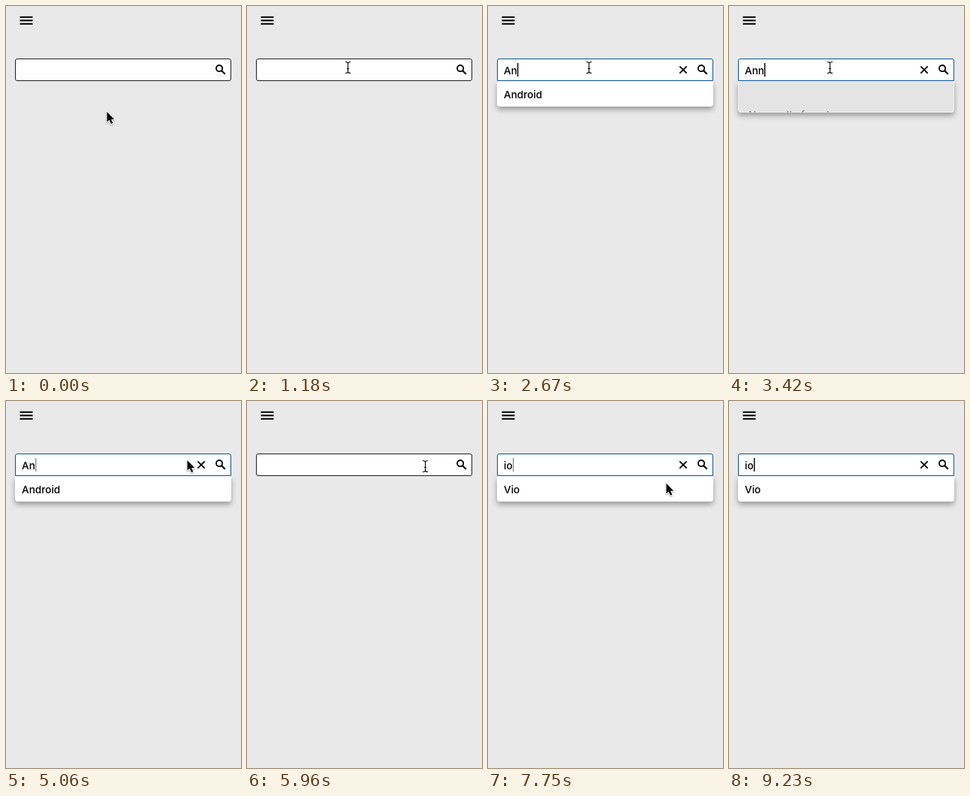
Recreate the animation shown at these times as an HTML page with a canvas. Size 313 px wide and 489 px high, loop 9.33 s.

```html
<!DOCTYPE html>
<html lang="en">
<head>
<meta charset="utf-8">
<title>Search field</title>
<style>
html, body { margin: 0; width: 100%; height: 100%; overflow: hidden; background: #e9e9e9; }
canvas { display: block; width: 313px; height: 489px; }
</style>
</head>
<body>
<canvas id="stage"></canvas>
<script>
const W = 313, H = 489, LOOP = 9330, STEP = 148.95;
const FONT = '500 13.6px Inter, "Open Sans", sans-serif';
const ITEMS = ['Android', 'Vio', 'Grombix', 'Linux', 'RavOS', 'Web'];
const canvas = document.getElementById('stage');
const ctx = canvas.getContext('2d');
const dpr = window.devicePixelRatio || 1;
canvas.width = W * dpr;
canvas.height = H * dpr;

const ARROW = new Path2D('M0 0V13.6L3.1 10.7 5.5 16 7.8 15 5.5 9.9H9.7Z');
const BEAM = new Path2D('M-3.5 -7.5Q0 -7.5 0 -5.5Q0 -7.5 3.5 -7.5M-3.5 7.5Q0 7.5 0 5.5Q0 7.5 3.5 7.5M0 -5.5V5.5M-1.5 1.5H1.5');

// Times are counted in steps of the clock.
const FIRST_CLICK = 9, CLEAR = 38, SECOND_CLICK = 41, POINTER_GONE = 58;
const KEYS = [
  { at: 0, text: '' }, { at: 15, text: 'A' }, { at: 18, text: 'An' }, { at: 23, text: 'Ann' },
  { at: 28, text: 'An' }, { at: CLEAR, text: '' }, { at: 45, text: 'i' }, { at: 47, text: 'io' }
];
const HOME = { x: 134.5, y: 141 };
const MOVES = [
  { from: 1, to: 7, x: 134.5, y: 82 },
  { from: 31, to: 34, x: 241.5, y: 79 },
  { from: 34, to: 36, x: 257, y: 81 },
  { from: CLEAR, to: 40, x: 237.5, y: 87 },
  { from: 50, to: 57, x: 237.5, y: 202 }
];

const clamp = v => Math.max(0, Math.min(1, v));
const smooth = v => v * v * (3 - 2 * v);

function pointerAt(n) {
  return MOVES.reduce((p, m) => {
    const k = smooth(clamp((n - m.from) / (m.to - m.from)));
    return { x: p.x + (m.x - p.x) * k, y: p.y + (m.y - p.y) * k };
  }, HOME);
}

function stateAt(n) {
  const key = KEYS.filter(k => k.at <= n).pop();
  const click = n < CLEAR ? FIRST_CLICK : SECOND_CLICK;
  const open = n >= click;
  const age = n - Math.max(key.at, click + 1);
  return {
    text: key.text,
    age,
    open,
    focus: clamp((n - click) / 2),
    caret: !open ? 0 : age % 7 < 4 ? 1 : 0.45
  };
}

function box(x, y, w, h, r) {
  ctx.beginPath();
  ctx.roundRect(x, y, w, h, r);
}

function label(s, x, y, color = '#000') {
  ctx.fillStyle = color;
  ctx.fillText(s, x, y);
}

function line(x1, y1, x2, y2) {
  ctx.beginPath();
  ctx.moveTo(x1, y1);
  ctx.lineTo(x2, y2);
  ctx.stroke();
}

function drawMenu() {
  ctx.fillStyle = '#000';
  for (let i = 0; i < 3; i++) ctx.fillRect(18.5, 13.8 + 4.5 * i, 17, 2);
}

function drawSearchIcon() {
  ctx.strokeStyle = '#000';
  ctx.lineWidth = 1.8;
  ctx.beginPath();
  ctx.arc(284.1, 83.1, 4.1, 0, 2 * Math.PI);
  ctx.stroke();
  ctx.lineWidth = 2.2;
  line(287.2, 86.2, 291.8, 90.8);
}

function drawClearIcon() {
  ctx.strokeStyle = '#000';
  ctx.lineWidth = 1.8;
  line(255.3, 80.3, 264.7, 89.7);
  line(264.7, 80.3, 255.3, 89.7);
}

function drawPanel(height, fill) {
  ctx.save();
  ctx.shadowColor = 'rgba(0,0,0,.34)';
  ctx.shadowBlur = 7 * dpr;
  ctx.shadowOffsetY = 4 * dpr;
  ctx.fillStyle = fill;
  box(12, 100, 288, height, [0, 0, 4, 4]);
  ctx.fill();
  ctx.restore();
}

function drawList({ text, age }) {
  const rows = ITEMS.filter(s => s.toLowerCase().includes(text.toLowerCase()));
  if (rows.length) {
    drawPanel(2 + 32 * rows.length, '#fff');
    rows.forEach((s, i) => label(s, 21, 123 + 32 * i));
    return;
  }
  drawPanel(42, '#e4e4e4');
  ctx.save();
  ctx.strokeStyle = '#f3f3f3';
  ctx.lineWidth = 1;
  box(12.5, 100.5, 287, 41, [0, 0, 4, 4]);
  ctx.stroke();
  ctx.clip();
  label('No results found', 26, 126 + 24 * clamp(1 - age), '#777');
  ctx.restore();
}

function drawField({ text, open, focus, caret }) {
  const mix = (a, b) => Math.round(a + (b - a) * focus);
  ctx.fillStyle = '#fff';
  ctx.strokeStyle = `rgb(${mix(30, 10)},${mix(30, 84)},${mix(30, 148)})`;
  ctx.lineWidth = 1;
  box(12.5, 70.5, 287, 29, open ? [2.5, 2.5, 0, 0] : 2.5);
  ctx.fill();
  ctx.stroke();
  label(text, 21, 91);
  if (caret) {
    ctx.fillStyle = `rgba(0,0,0,${caret})`;
    ctx.fillRect(Math.ceil(21 + ctx.measureText(text).width), 76, 1.4, 18);
  }
  if (text) drawClearIcon();
  drawSearchIcon();
}

function drawPointer(n) {
  if (n >= POINTER_GONE) return;
  const { x, y } = pointerAt(n);
  const overText = y > 70 && y < 100 && x < 240;
  ctx.save();
  ctx.translate(x, y);
  ctx.lineJoin = 'round';
  ctx.strokeStyle = '#fff';
  if (overText) {
    ctx.lineWidth = 2.4;
    ctx.stroke(BEAM);
    ctx.strokeStyle = '#000';
    ctx.lineWidth = 1.1;
    ctx.stroke(BEAM);
  } else {
    ctx.shadowColor = 'rgba(0,0,0,.35)';
    ctx.shadowBlur = 2 * dpr;
    ctx.shadowOffsetY = dpr;
    ctx.lineWidth = 2;
    ctx.stroke(ARROW);
    ctx.shadowColor = 'transparent';
    ctx.fillStyle = '#000';
    ctx.fill(ARROW);
  }
  ctx.restore();
}

function draw(t) {
  const n = Math.floor((t + 16) / STEP);
  const state = stateAt(n);
  ctx.setTransform(dpr, 0, 0, dpr, 0, 0);
  ctx.font = FONT;
  ctx.fillStyle = '#e9e9e9';
  ctx.fillRect(0, 0, W, H);
  drawMenu();
  drawField(state);
  if (state.open) drawList(state);
  drawPointer(n);
}

const start = performance.now();
function tick() {
  draw((performance.now() - start) % LOOP);
  requestAnimationFrame(tick);
}
tick();
</script>
</body>
</html>
```
